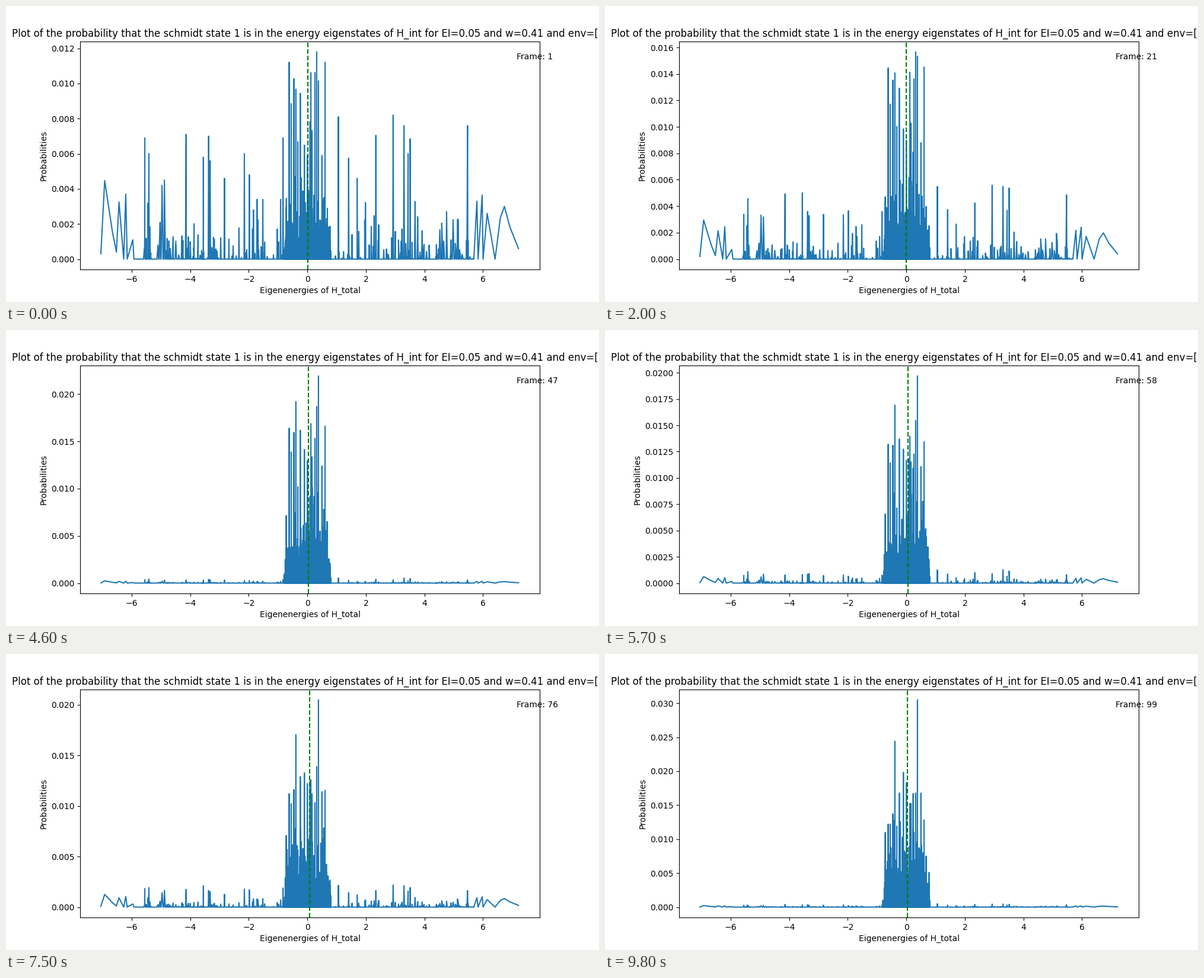
These frames come from a looping animation (1000 by 500 pixels, 9900 ms). A matplotlib script:

```python
import matplotlib.pyplot as plt
import numpy as np
from matplotlib.animation import FuncAnimation

FRAMES, INTERVAL = 99, 100
rng = np.random.default_rng(41)

# Tall band levels: energy, height relative to the peak at start and end
BAND = np.array([
    (-0.72, 0.25, 0.36), (-0.62, 0.95, 0.4), (-0.55, 0.75, 0.4),
    (-0.46, 0.87, 0.45), (-0.39, 0.82, 0.8), (-0.24, 0.8, 0.55),
    (-0.1, 0.55, 0.65), (0, 0.5, 0.6), (0.12, 0.9, 0.5), (0.16, 0.62, 0.5),
    (0.26, 0.9, 0.36), (0.32, 1, 0.55), (0.38, 0.86, 1), (0.5, 0.5, 0.55),
    (0.605, 0.95, 0.42),
])

# Strongest isolated levels: energy, starting height (1e-3)
ISOLATED = np.array([
    (-5.55, 6.9), (-5.41, 6), (-4.96, 4.2), (-4.88, 4.5), (-4.14, 7.1),
    (-3.55, 5.8), (-3.37, 7), (-3.32, 5.6), (-2.83, 4.6), (-2.15, 6),
    (-1.98, 4.8), (-0.83, 6.9), (1.06, 8.1), (1.41, 5.75), (1.7, 4.6),
    (2.34, 7.05), (2.93, 8.2), (3.3, 7.6), (3.44, 6), (3.51, 6.85),
    (5.47, 7.6),
])

# Sparse ends of the spectrum, joined point to point
ENDS = np.array([
    (-7.05, 0.3), (-6.92, 4.47), (-6.65, 1.5), (-6.52, 0.4), (-6.43, 3.25),
    (-6.27, 0), (-6.2, 3.7), (-6.15, 0), (-5.96, 1.1), (-5.92, 0),
    (5.66, 0), (5.79, 3.3), (5.83, 0), (5.97, 3.65), (6, 0), (6.14, 2.6),
    (6.41, 0), (6.59, 2.35), (6.73, 3), (6.91, 1.85), (7.21, 0.6),
])


def peak(t):
    return np.interp(t, [0, 20, 34, 46, 57, 68, 74, 83, 98],
                     [11.8, 15.67, 20.14, 21.94, 19.7, 21.47, 19.8, 26.08, 30.5]) / 1000


def outer_weight(t):
    return np.interp(t, [0, 20, 34, 47, 72, 83, 98],
                     [1, 0.66, 0.33, 0.03, 0.3, 0.23, 0.05])


def mean_energy(t):
    return np.interp(t, [0, 20, 34, 46, 68, 83, 98],
                     [0.013, -0.002, 0.038, 0.038, 0.058, 0.1, 0.038])


def sway(count, depth):
    """Slow seeded wobble around 1 for each level, as a function of time."""
    rate, phase = rng.uniform(0.05, 0.16, count), rng.uniform(0, 2 * np.pi, count)
    return lambda t: 1 + depth * np.sin(rate * t + phase)


def with_feet(x, foot):
    """Energies of the levels followed by the empty levels on either side."""
    return np.concatenate([x, x - foot, x + foot])


def padded(h):
    return np.concatenate([h, np.zeros(2 * len(h))])


fill_x = rng.uniform(-0.8, 0.8, 500)
fill_h = (np.clip(0.06 * rng.gamma(2, 1, 500), 0, 0.5)
          * np.sqrt(1 - (fill_x / 0.85) ** 2))
fill_sway = sway(len(fill_x), 0.4)

small_x = rng.choice([-1, 1], 180) * rng.uniform(0.85, 5.65, 180)
small_h = np.clip(rng.exponential(0.9, 180), 0, 3.4)
outer_x = np.concatenate([ISOLATED[:, 0], small_x])
outer_h = np.concatenate([ISOLATED[:, 1], small_h]) / 1000
outer_sway = sway(len(outer_x), 0.15)
outer_foot = 0.01 + 0.05 * (np.abs(outer_x) / 6) ** 4

energies = np.concatenate([
    with_feet(BAND[:, 0], 0.004),
    with_feet(fill_x, 0.004),
    with_feet(outer_x, outer_foot),
    ENDS[:, 0],
])
order = np.argsort(energies)


def probabilities(t):
    band = BAND[:, 1] + (BAND[:, 2] - BAND[:, 1]) * t / (FRAMES - 1)
    band *= peak(t) / band.max()
    fill = peak(t) * fill_h * fill_sway(t)
    outer = outer_weight(t) * outer_h * outer_sway(t) / outer_sway(0)
    ends = outer_weight(t) * ENDS[:, 1] / 1000
    return np.concatenate([padded(band), padded(fill), padded(outer), ends])[order]


fig, ax = plt.subplots(figsize=(10, 5), dpi=100)
line, = ax.plot(energies[order], probabilities(0))
mean_line = ax.axvline(0, color="green", linestyle="--")
ax.set_xlim(-7.758, 7.934)
ax.set_title("Plot of the probability that the schmidt state 1 is in the energy "
             "eigenstates of H_int for EI=0.05 and w=0.41 and env=[1]")
ax.set_xlabel("Eigenenergies of H_total")
ax.set_ylabel("Probabilities")
counter = ax.text(0.95, 0.95, "", transform=ax.transAxes, va="top")


def update(t):
    line.set_ydata(probabilities(t))
    ax.set_ylim(-0.05 * peak(t), 1.05 * peak(t))
    mean_line.set_xdata([mean_energy(t)] * 2)
    counter.set_text(f"Frame: {t + 1}")
    return line, mean_line, counter


anim = FuncAnimation(fig, update, frames=FRAMES, interval=INTERVAL, repeat=True)
plt.show()
```
